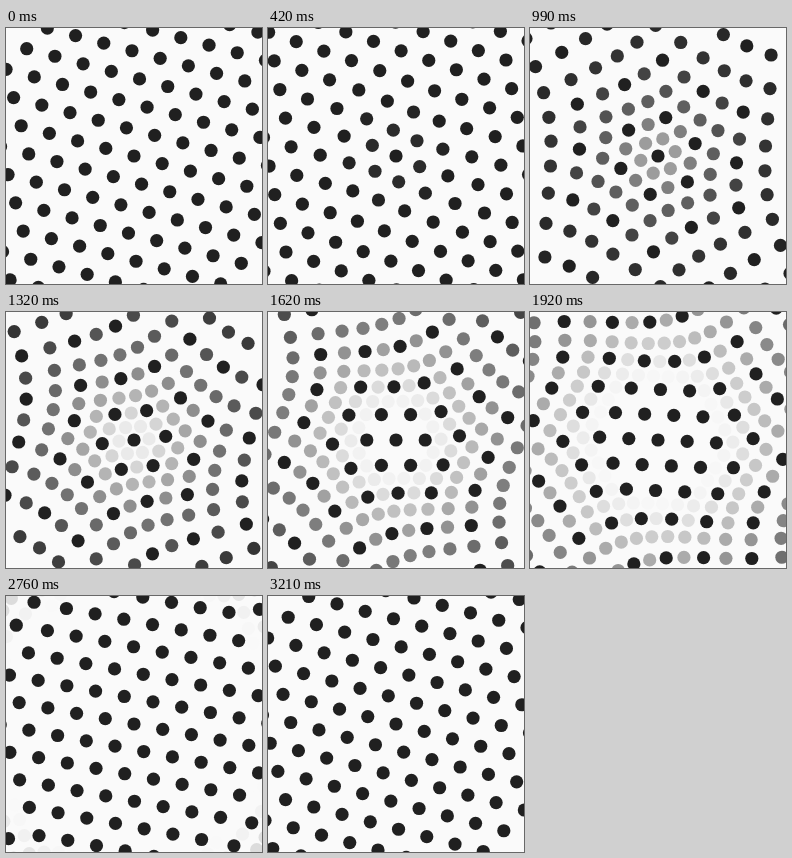
An HTML page with a canvas that plays this animation: 256x256 px, repeating every 3240 ms.

```html
<!DOCTYPE html>
<html lang="en">
<head>
<meta charset="utf-8">
<title>Collapsing dot lattice</title>
<style>
html, body { margin: 0; width: 100%; height: 100%; overflow: hidden; background: #fafafa; }
canvas { display: block; width: 256px; height: 256px; }
</style>
</head>
<body>
<canvas id="stage"></canvas>
<script>
const LOOP = 3240, STEP = 30, SIZE = 256;
const SPACING = 29.2, DOT = 6.6, REACH = 16;
const INK = 32, PAPER = 250;
const RAD = Math.PI / 180;

const canvas = document.getElementById('stage');
const ratio = window.devicePixelRatio || 1;
canvas.width = canvas.height = SIZE * ratio;
const ctx = canvas.getContext('2d');
ctx.scale(ratio, ratio);

// Triangular lattice; only the dots with two even indices survive the collapse.
const dots = [];
for (let i = -REACH; i <= REACH; i++) {
  for (let j = -REACH; j <= REACH; j++) {
    const x = (i + j / 2) * SPACING;
    const y = j * Math.sqrt(3) / 2 * SPACING;
    const radius = Math.hypot(x, y);
    if (radius < 410) {
      dots.push({ radius, angle: Math.atan2(y, x), stays: i % 2 === 0 && j % 2 === 0 });
    }
  }
}
dots.sort((a, b) => a.stays - b.stays);

const clamp = v => Math.min(1, Math.max(0, v));
const smooth = v => v * v * (3 - 2 * v);

function draw(t) {
  ctx.fillStyle = `rgb(${PAPER},${PAPER},${PAPER})`;
  ctx.fillRect(0, 0, SIZE, SIZE);
  for (const { radius, angle, stays } of dots) {
    // The collapse spreads outwards: far dots start later.
    const e = smooth(clamp(2.2 * t + 0.077 - 0.0034 * radius));
    if (!stays && e === 1) continue;
    const r = radius * 2 ** -e;
    const a = angle + (15 + 30 * t + 30 * e) * RAD;
    const tone = stays ? INK : Math.round(INK + (PAPER - INK) * e ** 1.7);
    ctx.fillStyle = `rgb(${tone},${tone},${tone})`;
    ctx.beginPath();
    ctx.arc(SIZE / 2 + r * Math.cos(a), SIZE / 2 + r * Math.sin(a), DOT, 0, 2 * Math.PI);
    ctx.fill();
  }
}

const start = performance.now();
function tick() {
  const step = Math.round((performance.now() - start) / STEP);
  draw(step * STEP % LOOP / LOOP);
  requestAnimationFrame(tick);
}
tick();
</script>
</body>
</html>
```
